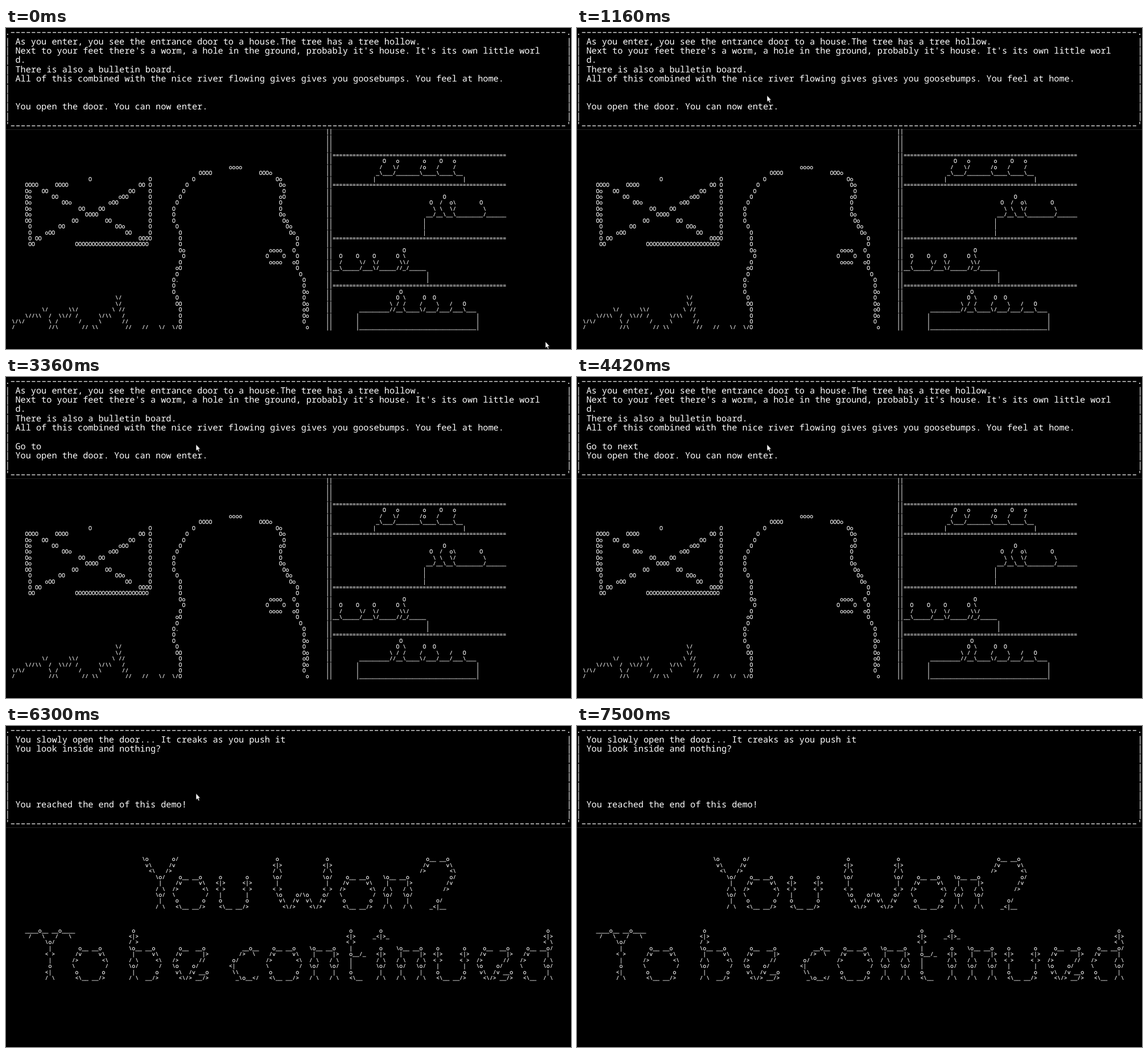
An HTML page for the animation above (8 s loop, 993x564 px).

```html
<!DOCTYPE html>
<html lang="en">
<head>
<meta charset="utf-8">
<title>Text adventure</title>
<style>
  html, body { margin: 0; width: 100%; height: 100%; overflow: hidden; background: #000; }
  svg { display: block; }
  text {
    font-family: "Noto Sans Mono", "DejaVu Sans Mono", monospace;
    white-space: pre;
    text-rendering: geometricPrecision;
    fill: #fff;
  }
  .story { font-size: 15.23px; }
  .art { font-size: 9.79px; stroke: #fff; stroke-width: .15px; }
</style>
</head>
<body>
<svg id="stage" width="993" height="564" viewBox="0 0 993 564">
  <path d="M0 178.5H993" stroke="#222"/>
  <g id="frame"></g>
  <g id="garden"></g>
  <g id="ending"></g>
  <path id="cursor" d="M0 0V11.2L2.5 9L4.4 13L6.2 12.2L4.4 8.3H7.6Z" fill="#fff" stroke="#000" stroke-width=".6"/>
</svg>
<script>
const LOOP = 8000;
const STORY = { cls: "story", x: -1.8, y: 12.2, w: 9.14, h: 16.4 };
const ART = { cls: "art", x: 4, y: 185.2, w: 5.875, h: 10.43 };
const raw = String.raw;
const $ = id => document.getElementById(id);

function write(parent, grid, col, row, str) {
  const el = document.createElementNS("http://www.w3.org/2000/svg", "text");
  el.setAttribute("class", grid.cls);
  el.setAttribute("x", grid.x + col * grid.w);
  el.setAttribute("y", grid.y + row * grid.h);
  el.textContent = str;
  parent.append(el);
  return el;
}

// Multi-line block; the line break after the opening backtick is dropped.
function block(parent, grid, col, row, str) {
  str.slice(1).split("\n").forEach((line, i) => {
    if (line.trim()) write(parent, grid, col, row + i, line);
  });
}

function play(el, table) {
  const frames = table.map(([t, style]) => ({ offset: t / LOOP, easing: "step-end", ...style }));
  el.animate(frames, { duration: LOOP, iterations: Infinity });
}

function showBetween(el, from, to) {
  const table = [[0, { opacity: from ? 0 : 1 }]];
  if (from) table.push([from, { opacity: 1 }]);
  table.push([to, { opacity: to < LOOP ? 0 : 1 }]);
  play(el, table);
}

// Story box
const frame = $("frame"), garden = $("garden"), ending = $("ending");
const dashes = "\u2013".repeat(107);
[[0, "."], [10, "'"]].forEach(([row, corner]) => write(frame, STORY, 0, row, corner + dashes + corner));
for (let row = 1; row < 10; row++) {
  write(frame, STORY, 0, row, "|");
  write(frame, STORY, 108, row, "|");
}

block(garden, STORY, 2, 1, `
As you enter, you see the entrance door to a house.The tree has a tree hollow.
Next to your feet there's a worm, a hole in the ground, probably it's house. It's its own little worl
d.
There is also a bulletin board.
All of this combined with the nice river flowing gives gives you goosebumps. You feel at home.


You open the door. You can now enter.`);

block(ending, STORY, 2, 1, `
You slowly open the door... It creaks as you push it
You look inside and nothing?





You reached the end of this demo!`);

// Typed command
const keyTimes = [2300, 2700, 3160, 3360, 3890, 4020, 4290, 4420, 4970, 5100, 5300, 5700];
let key = 0;
[..."Go to next room"].forEach((ch, i) => {
  if (ch !== " ") showBetween(write(garden, STORY, 2 + i, 7, ch), keyTimes[key++], LOOP);
});

// Bulletin board
block(garden, ART, 5, 8, `
                   O                 O
OOOO     OOOO                     OO O
Oo   OO                        OO    O
Oo      OO                  oOO      O
Oo         OOo           oOO         O
Oo              OO    OO             O
Oo                OOOO               O
OO            OO        OO           O
 O        OO               OOo       O
 O    oOO                     OO     O
 O OO                             OOOO
 OO            OOOOOOOOOOOOOOOOOOOOOO`);

// Tree
block(garden, ART, 49, 6, `
                 oooo
        OOOO
      O
    O
   O
  O
 O
O
O
O
 O
  O
  O
  O
  Oo
   O
  O
 oO
 O
O.
O
O
 O
 OO
  O
  O
  O`);
block(garden, ART, 75, 7, `
OOOo
     Oo
      Oo
       O
      oO
      O
      O
      Oo
       Oo
        Oo
         Oo
           O
           O
   oooo   O
  O    O   O
   oooo   oO
           O
            O
             O
             O
             Oo
             O
             Oo
             oO
             Oo
             O
              o`);

// Grass
block(garden, ART, 1, 28, raw`
                               \/
                               \/
         \/      \\/          \ //
    \//\\  /  \\// /      \/\\   /
\/\/       \ /      /     \      //
/          //\       // \\        //   //   \/  \/O`);

// River wall and banks
for (let row = 0; row < 34; row++) write(garden, ART, 95, row, "||");
for (const row of [4, 9, 18, 26]) write(garden, ART, 97, row, "=".repeat(52));
block(garden, ART, 109, 5, raw`
   O   o       o    O   o
  /   \/      /o   /    /
 _\___/_______\____\____\__
|                          |`);
block(garden, ART, 124, 11, raw`
      O
  O  /  o\       O
   \ \  \/        \
 __/__\__\________/______
|
|
|`);
block(garden, ART, 97, 20, raw`
                     O
  O    O    O      O \
  /     \/  \/      \\/
__\_____/___\/_____//_/_____
                            |
                            |`);
block(garden, ART, 104, 27, raw`
             O
            O \     O  O
          \ / /    /    \   /   O
 _________//__\____\/___/___/___\___
|                                   |
|                                   |
|___________________________________|`);

// Letters built from stick figures
const glyphs = {
  Y: raw`
\o       o/
 v\     /v
  <\   />
    \o/
     |
    / \
    \o/
     |
    / \
`,
  W: raw`
 o              o
<|>            <|>
/ \            / \
\o/            \o/
 |              |
< >            < >
 \o    o/\o    o/
  v\  /v  v\  /v
   <\/>    <\/>
`,
  "?": raw`
  o__ __o
 /v     v\
/>       <\
         o/
        /v
       />

     o/
   _<|__
`,
  T: raw`
____o__ __o____
 /   \   /   \
      \o/
       |
      < >
       |
       o
      <|
      / \
`,
  o: raw`
  o__ __o
 /v     v\
/>       <\
\         /
 o       o
 <\__ __/>
`,
  u: raw`
 o       o
<|>     <|>
< >     < >
 |       |
 o       o
 <\__ __/>
`,
  n: raw`
\o__ __o
 |     |>
/ \   / \
\o/   \o/
 |     |
/ \   / \
`,
  e: raw`
  o__  __o
 /v      |>
/>      //
\o    o/
 v\  /v __o
  <\/> __/>
`,
  c: raw`
    __o__
   />  \
 o/
<|
 \\
  _\o__</
`,
  b: raw`
 o
<|>
/ >
\o__ __o
 |     v\
/ \     <\
\o/      /
 |      o
/ \  __/>
`,
  t: raw`
 o
<|>
< >
 |
 o__/_
 |
 |
 o
 <\__
`,
  i: raw`
  o
_<|>_

  o
 <|>
 / \
 \o/
  |
 / \
`,
  d: raw`
        o
       <|>
       < \
  o__ __o/
 /v     |
/>     / \
\      \o/
 o      |
 <\__  / \
`
};

// Every letter stands on the last row of its line.
function spell(word, bottom, cols) {
  [...word].forEach((ch, i) => {
    const art = glyphs[ch];
    const rows = art.split("\n").length - 2;
    block(ending, ART, cols[i], bottom - rows + 1, art);
  });
}
spell("YouWon?", 13, [40, 49, 62, 79, 99, 112, 123]);
spell("Tobecontinued", 25, [5, 19, 36, 49, 66, 77, 90, 101, 109, 116, 127, 140, 153]);

showBetween(garden, 0, 6300);
showBetween(ending, 6300, LOOP);

// Pointer: time, x, y
const path = [
  [0, 948, 551], [70, 940, 545], [140, 880, 500], [210, 760, 410], [280, 620, 305],
  [340, 500, 218], [410, 410, 165], [480, 355, 138], [550, 338, 131], [690, 338, 129],
  [820, 337, 127], [890, 337, 120], [960, 336, 111], [1030, 335, 114], [1160, 334, 118.5],
  [7030, 340, 119], [7100, 385, 123], [7170, 470, 137], [7230, 580, 162],
  [7300, 700, 192], [7370, 815, 220], [7430, 907, 242]
];
play($("cursor"), [
  ...path.map(([t, x, y]) => [t, { transform: `translate(${x}px, ${y}px)`, opacity: 1 }]),
  [7500, { transform: "translate(993px, 270px)", opacity: 0 }]
]);
</script>
</body>
</html>
```
